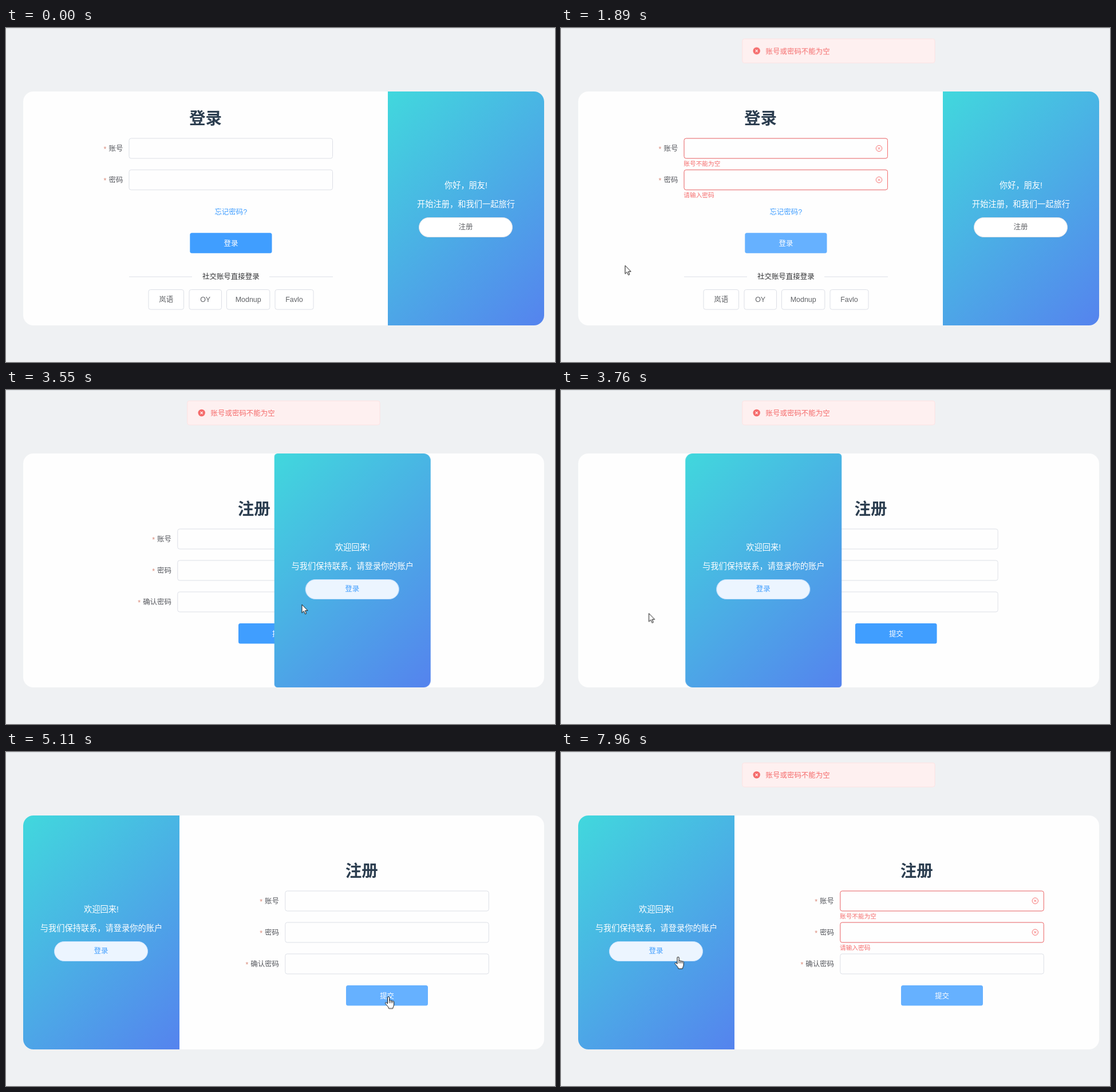
These frames come from a looping animation (959x584 px, 8000 ms). An HTML page:

```html
<!DOCTYPE html>
<html lang="zh-CN">
<head>
<meta charset="utf-8">
<title>登录 / 注册</title>
<style>
html, body { margin: 0; width: 100%; height: 100%; overflow: hidden; }
body {
  position: relative; background: #eff1f3;
  font: 12.46px "Liberation Sans", "Noto Sans CJK SC", "Noto Sans CJK", sans-serif;
}
svg { position: absolute; left: 0; top: 0; width: 959px; height: 584px; overflow: hidden; }
.mid { text-anchor: middle; }
.title { font-size: 28.5px; font-weight: 700; fill: #2c3e50; text-anchor: middle; }
.label { fill: #56585e; text-anchor: end; }
.star { fill: #d98a7a; }
.field { fill: none; stroke: #dcdfe6; }
.error .field { stroke: #f56c6c; }
.error text { font-size: 10.68px; fill: #f56c6c; }
.social rect { fill: #fff; stroke: #dcdfe6; }
.social text { fill: #606266; text-anchor: middle; }

/* sliding panel */
.panel {
  position: absolute; left: 667px; top: 111px; width: 273px; height: 409px;
  background: linear-gradient(135deg, #41d8dd, #5583ee); color: #fff; overflow: hidden;
}
.panel div { position: absolute; left: 0; width: 100%; text-align: center; white-space: nowrap; }
.panel p { position: absolute; margin: 0; width: 100%; font-size: 14.24px; line-height: 20px; }
.panel .pill {
  left: 54px; top: 220px; width: 164px; height: 35px; line-height: 33px;
  box-sizing: border-box; border: 1px solid #dcdfe6; border-radius: 18px;
}
.pill span { position: absolute; left: 0; width: 100%; }

/* shared 8 s clock */
.step { animation: 8s step-end infinite; }
.move { animation: 8s linear infinite; }
.before { animation-name: before; }
.after { animation-name: after; }
.panel { animation-name: slide; }
.pill { animation-name: pill; }
.shift { animation-name: shift; }
.err1 { animation-name: err1; }
.err2 { animation-name: err2; }
.toast { animation-name: toast; }
.login { animation-name: login; }
.submit { animation-name: submit; }
.hover rect { animation-name: hoverBox; }
.hover text { animation-name: hoverText; }
.cursor { animation-name: path; }
.seen { animation-name: seen; }
.hand { animation-name: hand; }
.arrow { animation-name: arrow; }
.click { animation-name: click; }

@keyframes before { 0% { opacity: 1 } 41.75% { opacity: 0 } }
@keyframes after { 0% { opacity: 0 } 41.75% { opacity: 1 } }
@keyframes slide {
  0%, 41.8% { transform: translateX(0); border-radius: 0 17.8px 17.8px 0; animation-timing-function: ease }
  54.3%, 100% { transform: translateX(-637px); border-radius: 17.8px 0 0 17.8px }
}
@keyframes shift {
  0%, 41.8% { transform: translateX(-273px); animation-timing-function: ease }
  54.3%, 100% { transform: translateX(0) }
}
@keyframes pill {
  0%, 65% { background: #fff; border-color: #dcdfe6; color: #606266 }
  35%, 41.75%, 98.6% { background: #ecf5ff; border-color: #c6e2ff; color: #409eff }
  40% { background: #ecf5ff; border-color: #3a8ee6; color: #3a8ee6 }
}
@keyframes err1 { 0%, 16.5% { opacity: 0 } 19%, 100% { opacity: 1 } }
@keyframes err2 { 0%, 65% { opacity: 0 } 67.5%, 100% { opacity: 1 } }
@keyframes toast {
  0%, 16.5%, 58.2%, 65% { opacity: 0; transform: translateY(-42.5px); animation-timing-function: ease }
  20.5%, 54.4%, 69%, 100% { opacity: 1; transform: translateY(0); animation-timing-function: ease }
}
@keyframes login { 0%, 40% { fill: #409eff } 12%, 16.5% { fill: #66b1ff } 15.625% { fill: #3a8ee6 } }
@keyframes submit { 0% { fill: #409eff } 59.75%, 65% { fill: #66b1ff } 64.125% { fill: #3a8ee6 } }
@keyframes hoverBox {
  0%, 8.875% { fill: #fff; stroke: #dcdfe6 }
  7.375% { fill: #ecf5ff; stroke: #c6e2ff }
}
@keyframes hoverText { 0%, 8.875% { fill: #606266 } 7.375% { fill: #409eff } }
@keyframes seen { 0%, 77.4% { opacity: 0 } 1.625%, 90.125% { opacity: 1 } }
@keyframes hand {
  0%, 8.875%, 17.75%, 42.5%, 67.875% { opacity: 0 }
  7.375%, 12%, 34.75%, 59.625%, 98.5% { opacity: 1 }
}
@keyframes arrow {
  0%, 8.875%, 17.75%, 42.5%, 67.875% { opacity: 1 }
  7.375%, 12%, 34.75%, 59.625%, 98.5% { opacity: 0 }
}
@keyframes click { 0%, 17.5%, 41.75%, 66% { opacity: 0 } 15.625%, 40%, 64.125% { opacity: .9 } }
@keyframes path {
  0%, 1.625% { transform: translate(645px, 565px) }
  8.125% { transform: translate(435px, 475px) }
  11.125% { transform: translate(398px, 402px) }
  12% { transform: translate(392px, 388px) }
  15.625%, 17.5% { transform: translate(392px, 378px) }
  20.125% { transform: translate(53px, 455px) }
  21% { transform: translate(75px, 437px) }
  21.75% { transform: translate(90px, 425px) }
  23.625% { transform: translate(111.5px, 415.5px) }
  28.25% { transform: translate(295px, 341px) }
  32.125% { transform: translate(580px, 330px) }
  35% { transform: translate(815px, 345px) }
  36.875%, 41.75% { transform: translate(831.5px, 350px) }
  43.5% { transform: translate(740px, 365px) }
  45.25% { transform: translate(300px, 385px) }
  47% { transform: translate(153.5px, 390.5px) }
  50% { transform: translate(150px, 392px) }
  53.625% { transform: translate(221.5px, 398.5px) }
  56.25% { transform: translate(363px, 405px) }
  58% { transform: translate(456px, 413px) }
  59.75% { transform: translate(600px, 424px) }
  62.5%, 67.5% { transform: translate(668px, 428px) }
  73.125% { transform: translate(395px, 449px) }
  77% { transform: translate(764px, 572px) }
  90.125% { transform: translate(842px, 570px) }
  95% { transform: translate(480px, 480px) }
  98.125% { transform: translate(215px, 366px) }
  99.5%, 100% { transform: translate(204.5px, 358.5px) }
}
</style>
</head>
<body>
<svg viewBox="0 0 959 584">
  <defs>
    <rect id="field" width="355.5" height="35" rx="3.5"/>
    <g id="bad" fill="none" stroke="#f56c6c">
      <circle r="5.2"/><path d="M-2 -2L2 2M2 -2L-2 2"/>
    </g>
  </defs>
  <path d="M0 .5H959" stroke="#dcdfe2"/>
  <rect x="30" y="111" width="910" height="409" rx="17.8" fill="#fefefe"/>

  <g class="step before">
    <text class="title" x="348.5" y="168">登录</text>
    <text class="star" x="170.5" y="216">*</text><text class="label" x="204.4" y="215.2">账号</text>
    <text class="star" x="170.5" y="271">*</text><text class="label" x="204.4" y="270.2">密码</text>
    <use href="#field" class="field" x="215" y="193"/>
    <use href="#field" class="field" x="215" y="248"/>
    <g class="error move err1">
      <use href="#field" class="field" x="215" y="193"/>
      <use href="#field" class="field" x="215" y="248"/>
      <use href="#bad" x="555.5" y="210.5"/><use href="#bad" x="555.5" y="265.5"/>
      <text x="214.3" y="241">账号不能为空</text><text x="214.3" y="296">请输入密码</text>
    </g>
    <text class="mid" x="392.8" y="325.7" fill="#409eff">忘记密码?</text>
    <rect class="step login" x="321.3" y="358.2" width="143.2" height="35.6" rx="3.5"/>
    <text class="mid" x="393" y="380.8" fill="#fff">登录</text>
    <path d="M215 435H325M460 435H571" stroke="#dcdfe6"/>
    <text class="mid" x="392.8" y="439.3" fill="#303133">社交账号直接登录</text>
    <g class="social">
      <rect x="249" y="457.5" width="61.5" height="34.6" rx="3.5"/><text x="279.7" y="479.4">岚语</text>
      <rect x="320" y="457.5" width="56.5" height="34.6" rx="3.5"/><text x="348.2" y="479.4">OY</text>
      <g class="hover">
        <rect class="step" x="385.5" y="457.5" width="75.3" height="34.6" rx="3.5"/>
        <text class="step" x="423.2" y="479.4">Modnup</text>
      </g>
      <rect x="470" y="457.5" width="67" height="34.6" rx="3.5"/><text x="503.5" y="479.4">Favlo</text>
    </g>
  </g>

  <g class="step after"><g class="move shift">
    <text class="title" x="621.3" y="218">注册</text>
    <text class="star" x="443.3" y="266">*</text><text class="label" x="477" y="265.2">账号</text>
    <text class="star" x="443.3" y="321">*</text><text class="label" x="477" y="320.2">密码</text>
    <text class="star" x="418.4" y="376">*</text><text class="label" x="477" y="375.2">确认密码</text>
    <use href="#field" class="field" x="487.8" y="243"/>
    <use href="#field" class="field" x="487.8" y="298"/>
    <use href="#field" class="field" x="487.8" y="353"/>
    <g class="error move err2">
      <use href="#field" class="field" x="487.8" y="243"/>
      <use href="#field" class="field" x="487.8" y="298"/>
      <use href="#bad" x="828.3" y="260.2"/><use href="#bad" x="828.3" y="315.2"/>
      <text x="487" y="291">账号不能为空</text><text x="487" y="346">请输入密码</text>
    </g>
    <rect class="step submit" x="594" y="408" width="143" height="35.5" rx="3.5"/>
    <text class="mid" x="665.6" y="430.6" fill="#fff">提交</text>
  </g></g>
</svg>

<div class="panel move">
  <div class="step before">
    <p style="top:154px">你好，朋友!</p><p style="top:187px">开始注册，和我们一起旅行</p>
  </div>
  <div class="step after">
    <p style="top:154px">欢迎回来!</p><p style="top:187px">与我们保持联系，请登录你的账户</p>
  </div>
  <div class="pill step">
    <span class="step before">注册</span><span class="step after">登录</span>
  </div>
</div>

<svg viewBox="0 0 959 584">
  <g class="move toast">
    <rect x="316.8" y="19" width="336.2" height="42" rx="3.5" fill="#fef0f0" stroke="#fde2e2"/>
    <circle cx="341.7" cy="40" r="6.2" fill="#f56c6c"/>
    <path d="M339.6 37.9l4.2 4.2m0 -4.2l-4.2 4.2" stroke="#fff" stroke-width="1.2"/>
    <text x="357.6" y="45" fill="#f56c6c">账号或密码不能为空</text>
  </g>
  <g class="step seen"><g class="cursor move">
    <circle class="step click" cx="-1.5" r="10.5" fill="#f4f568"/>
    <path class="step arrow" fill="#fff" stroke="#111"
      d="M0 0V14.5L3.3 11.4 5.7 16.6 7.9 15.6 5.6 10.6H10.2Z"/>
    <path class="step hand" transform="translate(-6 -.5)" fill="#fff" stroke="#111"
      d="M4.5 12.5V2a1.6 1.6 0 0 1 3.2 0V7.5a1.5 1.5 0 0 1 2.9.4 1.5 1.5 0 0 1 2.6.6 1.4 1.4 0 0 1 2.5 1V14c0 3-1.7 4-2 7H6.7C6.3 18 3 15.5.8 12.4 0 11 1.5 9.7 2.8 10.8ZM7.7 7.5V11.5M10.6 8V11.5M13.2 8.5V11.5"/>
  </g></g>
</svg>
</body>
</html>
```
